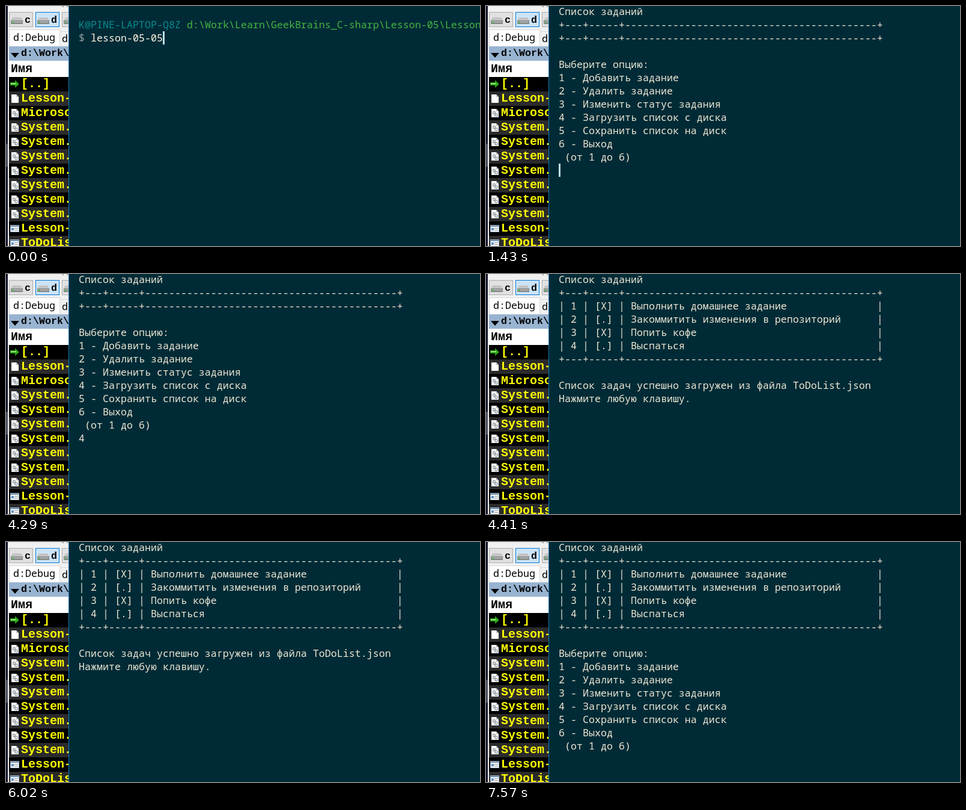
Write an HTML page with a canvas that moves like this. It is 789 px wide and 399 px high and loops after 8000 ms.

```html
<!DOCTYPE html>
<html lang="ru">
<head>
<meta charset="utf-8">
<title>Список заданий</title>
<style>
html, body { margin: 0; width: 100%; height: 100%; overflow: hidden; background: #002b36; }
canvas { display: block; width: 789px; height: 399px; }
</style>
</head>
<body>
<canvas id="stage" width="789" height="399"></canvas>
<script>
const ctx = document.getElementById('stage').getContext('2d');
const LOOP = 8000;
const MONO = '16.667px "Noto Sans Mono", "DejaVu Sans Mono", monospace';
const bold = size => `bold ${size}px "Liberation Mono", "Courier New", monospace`;
const INK = '#eee8d5';

const rule = '+---+-----+' + '-'.repeat(42) + '+';
const task = (n, mark, text) => `| ${n} | [${mark}] | ${text.padEnd(41)}|`;
const title = 'Список заданий';
const menu = [
  'Выберите опцию:',
  '1 - Добавить задание',
  '2 - Удалить задание',
  '3 - Изменить статус задания',
  '4 - Загрузить список с диска',
  '5 - Сохранить список на диск',
  '6 - Выход',
  ' (от 1 до 6)'
];
const table = [
  title, rule,
  task(1, 'X', 'Выполнить домашнее задание'),
  task(2, '.', 'Закоммитить изменения в репозиторий'),
  task(3, 'X', 'Попить кофе'),
  task(4, '.', 'Выспаться'),
  rule, ''
];
const prompt = [
  '',
  [['K@PINE-LAPTOP-Q8Z', '#0b8a8f'],
   [' d:\\Work\\Learn\\GeekBrains_C-sharp\\Lesson-05\\Lesson-05-05', '#45b443']],
  [['$', '#93a1a1'], [' lesson-05-05', '#fdf6e3']]
];
const empty = [title, rule, rule, '', ...menu];
const loaded = [...table, 'Список задач успешно загружен из файла ToDoList.json', 'Нажмите любую клавишу.'];
const full = [...table, ...menu];

// start time, lines, cursor column and row, times at which the cursor toggles
const scenes = [
  { at: 0, lines: prompt, cur: [14, 2], flips: [0, 120, 650, 1180] },
  { at: 1400, lines: prompt, cur: [0, 3], flips: [1400] },
  { at: 1430, lines: empty, cur: [0, 12], flips: [1430, 1960, 2490, 3050, 3580, 4110] },
  { at: 4290, lines: [...empty, '4'], cur: [1, 12], flips: [] },
  { at: 4410, lines: loaded, cur: [0, 10], flips: [4440, 4970, 5500, 6020, 6550] },
  { at: 7040, lines: full, cur: [0, 16], flips: [7040, 7570] }
];

function rect(x, y, w, h, color) {
  ctx.fillStyle = color;
  ctx.fillRect(x, y, w, h);
}

function label(text, x, y, font, color) {
  ctx.font = font;
  ctx.fillStyle = color;
  ctx.fillText(text, x, y);
}

function poly(points, color) {
  ctx.fillStyle = color;
  ctx.beginPath();
  points.forEach(([x, y]) => ctx.lineTo(x, y));
  ctx.closePath();
  ctx.fill();
}

function frame(x, y, w, h, line, fill) {
  rect(x, y, w, h, line);
  rect(x + 1, y + 1, w - 2, h - 2, fill);
}

function drive(x, name, line, fill) {
  frame(x, 10, 40, 25, line, fill);
  poly([[x + 6, 19], [x + 20, 19], [x + 23, 24], [x + 3, 24]], '#c4c4c4');
  rect(x + 3, 24, 20, 6, '#858585');
  rect(x + 4, 25, 18, 3, '#a9a9a9');
  rect(x + 5, 26, 3, 2, '#35d135');
  label(name, x + 26, 28, bold(16.667), '#000');
}

function page(y) {
  poly([[9, y + 5], [17, y + 5], [21, y + 9], [21, y + 19], [9, y + 19]], '#fff');
  poly([[17, y + 5], [21, y + 9], [17, y + 9]], '#b8b8b8');
}

function gear(x, y, r) {
  ctx.strokeStyle = '#8b949c';
  ctx.lineWidth = 1.3;
  ctx.beginPath();
  ctx.arc(x, y, r, 0, 7);
  ctx.stroke();
}

const icons = {
  up(y) {
    poly([[7, y + 9], [15, y + 9], [15, y + 5], [22, y + 12], [15, y + 18], [15, y + 14], [7, y + 14]], '#2fa41c');
    rect(8, y + 10, 9, 2, '#8ee46c');
  },
  doc: page,
  lib(y) {
    page(y);
    gear(13.5, y + 11.5, 2);
    gear(17, y + 15, 2.2);
  },
  app(y) {
    frame(7, y + 6, 15, 12, '#9fb0c0', '#fff');
    rect(8, y + 7, 13, 2, '#6e93b8');
    rect(9, y + 11, 4, 4, '#5b8ec4');
    rect(14, y + 11, 6, 1, '#8a8a8a');
    rect(14, y + 14, 6, 1, '#8a8a8a');
  }
};

const files = [
  ['up', '[..]'], ['doc', 'Lesson-'], ['lib', 'Microsoft'],
  ...Array(7).fill(['lib', 'System.']),
  ['app', 'Lesson-'], ['app', 'ToDoList']
];

function drawPanel() {
  rect(0, 0, 104, 399, '#f0f0f0');
  rect(0, 0, 3, 399, '#15172b');
  rect(0, 229, 3, 38, '#4c4f5c');
  rect(94, 0, 2, 2, '#a0a0a0');
  rect(101, 0, 2, 2, '#a0a0a0');

  drive(5, 'c', '#adadad', '#e1e1e1');
  drive(49, 'd', '#0078d7', '#cce4f7');
  drive(93, '', '#adadad', '#e1e1e1');

  frame(5, 39, 85, 29, '#d9d9d9', '#fff');
  frame(89, 42, 30, 26, '#d9d9d9', '#f0f0f0');
  label('d:Debug', 12, 58, MONO, '#000');
  label('d', 93, 60, MONO, '#000');

  rect(5, 67, 99, 24, '#99b4d1');
  poly([[8, 78], [22, 78], [15, 86]], '#000');
  label('d:\\Work\\', 25, 83, bold(16.667), '#000');

  rect(5, 91, 99, 27, '#fff');
  label('Имя', 8, 110, bold(20), '#000');

  files.forEach(([icon, name], i) => {
    const y = 118 + 24 * i;
    rect(5, y, 99, 24, i % 2 ? '#2b2b2b' : '#000');
    icons[icon](y);
    label(name, 25, y + 17, bold(20), '#ff0');
  });
}

function drawLine(line, row) {
  let x = 121;
  const runs = typeof line === 'string' ? [[line, INK]] : line;
  for (const [text, color] of runs) {
    label(text, x, 15 + 22 * row, MONO, color);
    x += 10 * text.length;
  }
}

function draw(t) {
  const scene = scenes.filter(s => s.at <= t).pop();
  drawPanel();
  rect(104, 0, 1, 399, '#1878b8');
  rect(105, 0, 684, 399, '#002b36');
  scene.lines.forEach(drawLine);
  if (scene.flips.filter(f => f <= t).length % 2) {
    const [col, row] = scene.cur;
    rect(121 + 10 * col, 22 * row - 2, 3, 22, '#b9e2f0');
  }
}

const start = performance.now();
function tick() {
  draw((performance.now() - start) % LOOP);
  requestAnimationFrame(tick);
}
tick();
</script>
</body>
</html>
```
